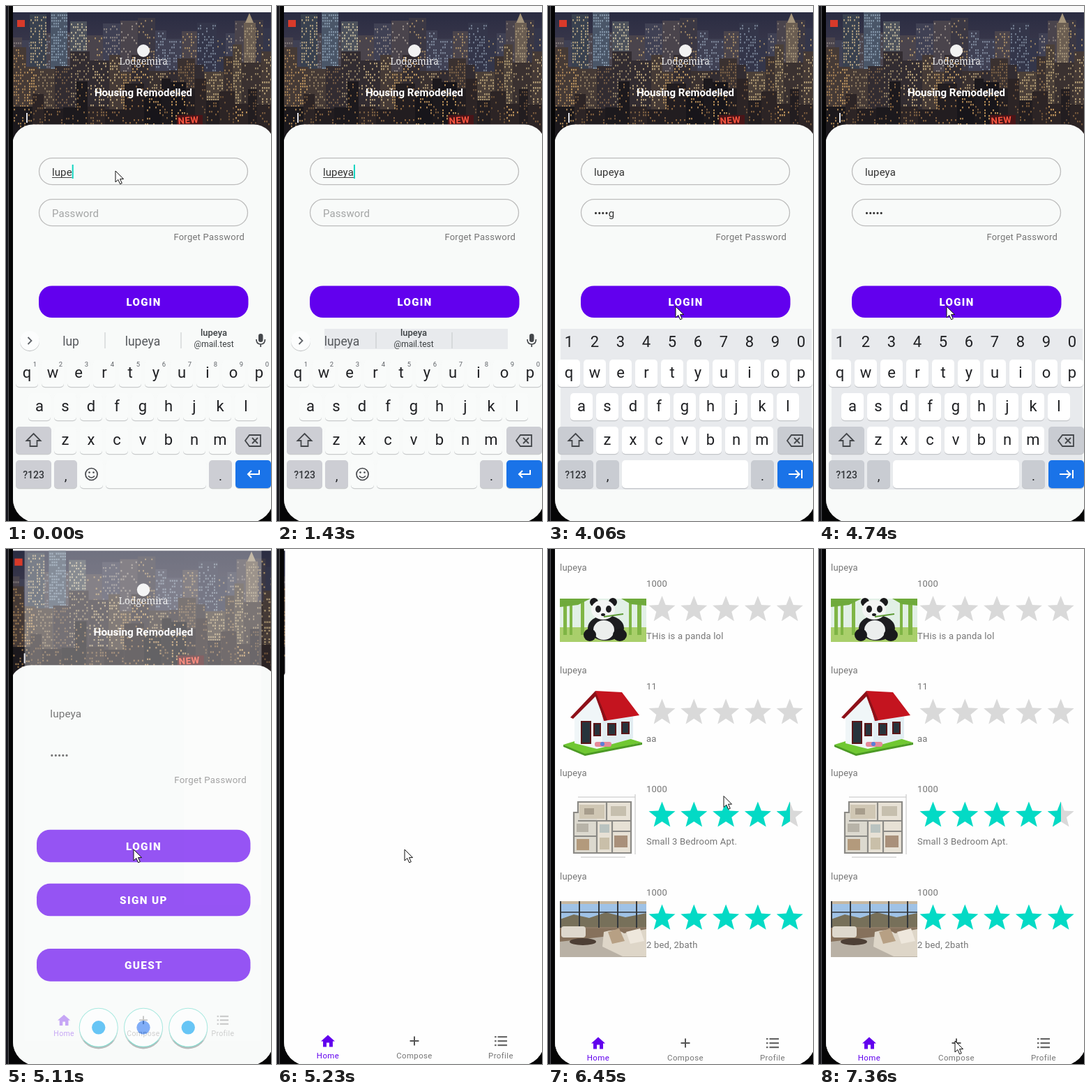
These frames come from a looping animation (380x737 px, 8 s). An HTML page:

```html
<!DOCTYPE html>
<html lang="en">
<head>
<meta charset="utf-8">
<title>Login to home feed</title>
<style>
  html, body { margin: 0; width: 100%; height: 100%; overflow: hidden; background: #050506; }
  svg { display: block; width: 380px; height: 737px; font-family: Roboto, sans-serif; white-space: pre; }
</style>
</head>
<body>
<svg id="stage" viewBox="0 0 380 737"></svg>
<script>
const LOOP = 8000, USER = 'lupeya', PASSWORD = 'loyng';
const PURPLE = '#6200ee', TEAL = '#03dac5', GREY = '#757575', INK = '#202124';

// Markup helpers
const rect = (x, y, w, h, fill, rx = 0, more = '') =>
  `<rect x="${x}" y="${y}" width="${w}" height="${h}" rx="${rx}" fill="${fill}" ${more}/>`;
const circle = (x, y, r, fill, more = '') => `<circle cx="${x}" cy="${y}" r="${r}" fill="${fill}" ${more}/>`;
const oval = (x, y, rx, ry, fill) => `<ellipse cx="${x}" cy="${y}" rx="${rx}" ry="${ry}" fill="${fill}"/>`;
const path = (d, fill, more = '') => `<path d="${d}" fill="${fill}" ${more}/>`;
const line = (d, color, width = 1.8) => path(d, 'none', `stroke="${color}" stroke-width="${width}"`);
const text = (x, y, s, size, fill, more = '') =>
  `<text x="${x}" y="${y}" font-size="${size}" fill="${fill}" ${more}>${s}</text>`;
const MID = 'text-anchor="middle" ';
const group = (id, body, more = '') => `<g id="${id}" ${more}>${body}</g>`;

function city() {
  let seed = 29;
  const random = () => (seed = (seed * 16807) % 2147483647) / 2147483647;
  const pick = list => list[Math.floor(random() * list.length)];
  const tower = (x, top, w, fill, glow, density) => {
    let d = '';
    for (let wy = top + 3; wy < 172; wy += 4)
      for (let wx = x + 1; wx < x + w - 1.5; wx += 3)
        if (random() < density) d += `M${wx} ${wy}h2v2.4h-2z`;
    return rect(x, top, w, 205 - top, fill) + path(d, glow, `opacity="${(.45 + random() * .45).toFixed(2)}"`);
  };
  const row = (high, low, fills, glows, density) => {
    let out = '';
    for (let x = 10, w; x < 384; x += w) {
      w = 13 + Math.floor(random() * 6) * 3;
      const top = Math.round(high + random() * (low - high));
      out += tower(x, top, w, pick(fills), pick(glows), density * (.5 + random()));
    }
    return out;
  };
  return rect(0, 9, 390, 196, 'url(#sky)') +
    row(14, 52, ['#34364a', '#404154', '#3b3844', '#4a444c'], ['#a39a92', '#b09468', '#8793a6'], .3) +
    tower(34, 12, 24, '#39414f', '#b9a684', .5) + tower(64, 9, 24, '#4a5668', '#9fb4c8', .55) +
    tower(92, 22, 24, '#4d525c', '#c3b89c', .55) + tower(341, 24, 17, '#6b5e52', '#b8a486', .5) +
    path('M343 24l6-14 6 14z', '#a5957c') +
    row(54, 96, ['#3a3130', '#453a36', '#322c31', '#4b4039'], ['#d0a566', '#b98f5a', '#dcc08c'], .42) +
    row(104, 148, ['#17151a', '#221d20', '#2c2425', '#1c191d'], ['#a87a48', '#8f6a44', '#c79a5e'], .26) +
    rect(16, 20, 11, 10, '#d83a2a') + rect(29, 153, 2, 14, '#e4e4ea') + rect(245, 156, 37, 16, '#4a1518') +
    text(247, 169, 'NEW', 13, '#ff5540', 'font-weight="700" letter-spacing=".6" transform="rotate(-4 247 169)"');
}

const button = (y, label) =>
  rect(47, y, 300.5, 45.7, PURPLE, 19, label === 'LOGIN' ? 'id="login"' : '') +
  text(197.5, y + 28.5, label, 15, '#fff', MID + 'font-weight="800" letter-spacing="1.35"');

const field = y => rect(47.5, y, 299, 38, 'none', 19, 'class="outline" stroke="#bdbdbd" stroke-width="1.3"');

function loginScreen() {
  const social = [[134, '#1da9f2'], [197, '#4285f4'], [260, '#1da9f2']].map(([x, color]) =>
    circle(x, 681, 27, '#b8bcbc') + circle(x, 678, 27, '#fcfdfd', 'stroke="#7fe0d2" stroke-width="1"') +
    circle(x, 678, 9.5, color)).join('');
  return rect(0, -70, 390, 810, '#f9f9f9') + city() +
    circle(197, 64, 9, '#f2f2f2') +
    text(197, 84, 'Lodgemira', 13.5, '#eee', MID + 'font-family="Noto Serif, serif"') +
    text(197, 128.5, 'Housing Remodelled', 15, '#fff', MID + 'font-weight="700"') +
    rect(9, 169.5, 376, 590, '#f8faf9', 30) +
    field(217.7) + field(276.7) +
    text(66, 243, '', 15, '#333', 'id="user" letter-spacing=".1"') +
    rect(66, 245, 0, 1, '#444', 0, 'id="underline"') +
    text(66, 302, '', 15, '#333', 'id="pass" letter-spacing=".1"') +
    rect(0, 0, 2, 20, '#12d5c1', 0, 'id="caret"') +
    text(342, 335, 'Forget Password', 13, GREY, 'text-anchor="end" letter-spacing=".25"') +
    button(400.4, 'LOGIN') + group('more', button(476, 'SIGN UP') + button(567.5, 'GUEST') + social);
}

const ROWS = [['qwertyuiop', 30, 506], ['asdfghjkl', 48, 554], ['zxcvbnm', 85, 602]];

function keyboard(dense) {
  const face = dense ? '#fff' : '#f9fbfa', special = dense ? '#c9ccd2' : '#cdced4';
  const key = (x, y, w, fill = face, h = 39) =>
    rect(x, y + 1.2, w, h, dense ? '#c3c5c9' : '#c9cbcc', 5) + rect(x, y, w, h, fill, 5);
  let out = dense ? rect(18, 462, 360, 230, '#e8eaed') : '';
  for (const [letters, left, y] of ROWS) [...letters].forEach((c, i) => {
    const x = left + 37 * i;
    out += key(x - 16, y, 32) + text(x, y + 25.5, c, 22, INK, MID);
    if (y === 506) {
      const digit = (i + 1) % 10;
      out += dense ? text(x, 488, digit, 22, INK, MID) : text(x + 11.5, 516, digit, 9.5, '#5f6368', MID);
    }
  });
  out += key(14, 602, 51, special) + key(329, 602, 51, special) +
    line('M39.5 612l10 10h-5v8h-10v-8h-5z', '#44474b') +
    line('M343 622l6-8h16v16h-16zM353 618l8 8M361 618l-8 8', '#44474b') +
    key(14, 650, 51, special, 40) + text(39.5, 675.5, '?123', 14, '#33363a', MID + 'font-weight="500"') +
    key(69, 650, 33, special, 40) + text(85.5, 679, ',', 19, INK, MID) +
    key(291, 650, 33, special, 40) + text(307.5, 679, '.', 19, INK, MID) + key(329, 650, 51, '#1a73e8', 40);
  if (dense) return out + key(106, 650, 181, face, 40) +
    line('M345 670h15M355 664.500l5.500 5.500-5.500 5.500M364 664v12', '#fff', 2);
  return out + key(106, 650, 33, face, 40) + key(143, 650, 144, face, 40) +
    circle(122.5, 670, 8.5, 'none', 'stroke="#44474b" stroke-width="1.7"') +
    circle(119.5, 667.5, 1.3, '#44474b') + circle(125.5, 667.5, 1.3, '#44474b') +
    line('M118 672.500q4.500 5 9 0', '#44474b', 1.6) +
    line('M363 664v6h-16M352 665l-5 5 5 5', '#fff', 2) +
    rect(68, 462, 263, 29, '#e8eaed', 0, 'id="strip"') +
    circle(34, 480.2, 14, '#c5c7c8') + circle(34, 479, 14, '#fcfdfd') +
    line('M31.500 474l5 5-5 5', '#5f6368') +
    rect(141.5, 467, 1, 23, '#c4c7ca') + rect(250.5, 467, 1, 23, '#c4c7ca') +
    text(93, 486, '', 17.5, '#55585c', MID + 'id="guess"') +
    text(196, 486, USER, 17.5, '#55585c', MID + 'id="name"') +
    group('mail', text(298, 472, USER, 13, '#3c4043', MID + 'font-weight="500"') +
      text(298, 488, '@mail.test', 12, '#3c4043', MID)) +
    rect(362, 469, 6.500, 12, '#44474b', 3.2) + line('M359 477q0 7 6.200 7t6.200-7M365.200 484v4', '#44474b', 1.7);
}

function star(cx, cy, fill, more = '') {
  const points = Array.from({ length: 10 }, (_, i) => {
    const r = i % 2 ? 8.6 : 20, a = i * Math.PI / 5;
    return (cx + r * Math.sin(a)).toFixed(1) + ',' + (cy - r * Math.cos(a)).toFixed(1);
  });
  return `<polygon points="${points.join(' ')}" fill="${fill}" ${more}/>`;
}

function panda() {
  const bamboo = [[22, 5], [31, 4], [47, 5], [116, 4], [128, 6]].map(([x, w]) => rect(x, 71, w, 52, '#7fb545')).join('');
  return rect(17, 71, 124, 62, '#e2f0e6') + rect(17, 112, 124, 21, '#a9cf6b') + bamboo +
    path('M17 71h44l-18 9-26 3zM141 71h-36l14 8 22 2z', '#6faa3c') +
    oval(83, 113, 26, 18, '#1d1d20') + oval(80, 116, 15, 14, '#eceeed') +
    oval(60, 123, 9, 9, '#19191b') + oval(103, 123, 10, 9, '#19191b') +
    circle(66, 76, 6, '#1a1a1c') + circle(93, 76, 6, '#1a1a1c') + oval(79, 87, 17, 14, '#f4f5f4') +
    oval(72, 86, 4, 5, '#1d1d20') + oval(87, 86, 4, 5, '#1d1d20') + oval(79, 94, 3, 2, '#1d1d20') +
    line('M80 97l28-4', '#5d9a35', 2);
}

function house() {
  const pane = (x, y, w, h) => rect(x, y, w, h, '#5a1618') + rect(x + 2, y + 2, w - 4, h - 4, '#27343c');
  return path('M22 280l62-19 51 16-82 18z', '#70c832') + path('M22 280l31 13 82-16v3l-82 16-31-13z', '#4c9a25') +
    path('M38 238l30-30 14 35v40l-12 3-32-8z', '#f0f6f8') + path('M78 238l44-6v39l-44 12z', '#e2edf2') +
    path('M68 203l38 2 25 33-51 8z', '#c4141f') + path('M68 203l-36 38 4 2 32-32 13 35 4-1z', '#8e1018') +
    pane(47, 246, 15, 33) + pane(65, 249, 11, 19) + pane(85, 249, 13, 18) + pane(105, 247, 12, 18) +
    rect(67, 276, 24, 7, '#e58a9a', 3) + circle(78, 279, 3, '#5a7fd8');
}

function plan() {
  const walls = 'M43 362h76v73h-82v-58h6zM43 389h76M70 389v46M92 389v46M37 411h33M92 404h27M84 362v27';
  return rect(43, 362, 76, 73, '#e7e1d5') + rect(37, 377, 33, 58, '#dcd9cf') +
    rect(45, 366, 36, 20, '#d0c7b4') + rect(52, 371, 14, 9, '#a79d8c') + rect(90, 368, 22, 14, '#c6bfae') +
    rect(41, 415, 18, 16, '#b39a7c') + rect(95, 410, 19, 17, '#a9907a') + rect(74, 394, 14, 12, '#b9c3c0') +
    rect(74, 413, 14, 17, '#c9bfa9') + rect(41, 393, 17, 12, '#b7b3a8') + line(walls, '#8b8a86', 2.2) +
    line('M43 355h82M125 351v86M47 441h64', '#c2c2c2', 1);
}

function lounge() {
  const mullions = [17, 44, 72, 99, 126].map(x => rect(x, 504, 2, 38, '#34383c')).join('');
  return rect(17, 504, 124, 80, '#8e7b66') + rect(17, 504, 124, 32, '#9fc2e6') +
    path('M17 530l20-7 22 5 24-8 28 7 30-6v20h-124z', '#77705a') + rect(17, 504, 124, 4, '#c7b79f') + mullions +
    rect(17, 519, 124, 1.5, '#34383c') + rect(17, 543, 124, 41, '#86715c') +
    path('M17 562l70-8 54 18v12h-124z', '#b9b1a5') + rect(19, 540, 35, 16, '#ded8cd', 4) +
    oval(50, 562, 19, 5, '#4d3f35') + path('M80 548q18-6 29 2l32-6v39h-34l-29-14z', '#ded6c8') +
    path('M86 548l16-5 8 18-18 4z', '#b7a084') + path('M112 548l20-5 6 18-20 4z', '#eee7dc');
}

const POSTS = [['1000', 0, 'THis is a panda lol'], ['11', 0, 'aa'],
  ['1000', 4.5, 'Small 3 Bedroom Apt.'], ['1000', 5, '2 bed, 2bath']];

function post([price, rating, title], row) {
  const y = row * 147.2, label = (x, dy, s) => text(x, y + dy, s, 13, GREY, 'letter-spacing=".22"');
  let stars = '';
  for (let i = 0; i < 5; i++) {
    const x = 163.5 + 45.8 * i, share = rating - i;
    stars += star(x, y + 87, share >= 1 ? TEAL : '#d9d9d9');
    if (share > 0 && share < 1) stars += star(x, y + 87, TEAL, 'clip-path="url(#half)"');
  }
  return label(17, 31, USER) + label(141, 54, price) + stars + label(141, 129, title);
}

function homeScreen() {
  const label = (x, s, color) => text(x, 732, s, 11.5, color, MID + 'letter-spacing=".4"');
  const bullets = [701, 707, 713].map(y => rect(313, y - 1, 2.5, 2.2, '#666') + rect(317.5, y - 1, 13.5, 2.2, '#666')).join('');
  return rect(10, -62, 373, 801, '#fefefe') +
    group('posts', POSTS.map(post).join('')) +
    group('photos', panda() + house() + plan() + lounge()) +
    path('M72 698.500l10 9h-3v8h-5v-6h-4v6h-5v-8h-3z', PURPLE) + label(72, 'Home', PURPLE) +
    line('M197 700.500v13M190.500 707h13', '#555', 2) + label(197, 'Compose', GREY) +
    bullets + label(322, 'Profile', GREY);
}

const stage = document.getElementById('stage');
stage.innerHTML = `<defs>
  <linearGradient id="sky" x2="0" y2="1"><stop stop-color="#2a2c42"/><stop offset=".5" stop-color="#4a4454"/><stop offset="1" stop-color="#2a2226"/></linearGradient>
  <clipPath id="screen">${rect(10, -62, 373, 801, '#000', 34)}</clipPath>
  <clipPath id="half">${rect(300, 300, 47, 300, '#000')}</clipPath></defs>` +
  rect(0, 0, 380, 737, '#050506') + rect(0, 0, 1.2, 737, '#1c1c2a') + rect(2.5, 0, 1.6, 737, '#4c4c52') +
  group('view', group('loginView', loginScreen()) + group('keysText', keyboard(false)) +
    group('keysDense', keyboard(true)) + group('homeView', homeScreen()), 'clip-path="url(#screen)"') +
  group('mouse', path('M0 0v16l3.800-3.500 2.800 6.300 2.700-1.200-2.800-6h5z', '#fff', 'stroke="#111" stroke-width="1"'));

const el = {};
stage.querySelectorAll('[id]').forEach(node => el[node.id] = node);
const outlines = stage.querySelectorAll('.outline');
const set = (node, name, value) => node.setAttribute(name, value);
const show = (node, on) => set(node, 'visibility', on ? 'visible' : 'hidden');

// Last entry whose time has been reached
const stepped = (keys, t) => keys.reduce((hit, key) => t >= key[0] ? key : hit);

const MOUSE = [[0, 157, 236], [1190, 157, 236], [1400, 213, 230], [1550, 325, 205], [1700, 190, 270],
  [1780, 140, 299], [3599, 140, 299], [3600, 160, 310], [3730, 160, 310], [4060, 183, 430], [6280, 183, 430],
  [6450, 252, 354], [6520, 252, 325], [6620, 238, 370], [6780, 200, 500], [6930, 178, 610], [7140, 202, 684],
  [7360, 195, 704], [LOOP, 195, 704]];

function mouseAt(t) {
  const i = Math.max(1, MOUSE.findIndex(key => key[0] > t));
  const [t0, x0, y0] = MOUSE[i - 1], [t1, x1, y1] = MOUSE[i];
  const k = (t - t0) / (t1 - t0);
  return [x0 + (x1 - x0) * k, y0 + (y1 - y0) * k];
}

const TYPED = [[0, 4], [150, 5], [270, 6]];
const GUESS = [[0, 3], [210, 4], [440, 6]];
const SECRET = [[0, 0], [2690, 1], [2870, 2], [2990, 3], [3110, 4], [3290, 5]];
const CARET = [[0, 1], [940, 0], [1430, 1], [2200, 0], [2690, 1], [3790, 0], [4290, 1], [4740, 0]];
const PRESS = [[0, PURPLE], [4200, '#7a28f0'], [4290, '#8a43f2'], [4380, PURPLE]];
const OPEN = [[0, .85, 0], [5110, .911, .33], [5170, .963, .8], [5230, .992, 1], [5290, .996, 1], [5350, .998, 1], [5380, 1, 1]];
const LOAD = [[0, 0], [5910, .2], [5970, .4], [6030, .6], [6100, .8], [6160, 1]];

const zoom = s => `translate(197 338) scale(${s}) translate(-197 -338)`;

function render(t) {
  const leaving = t >= 5110, inPassword = t >= 1700, dense = t >= 1780, offered = t >= 440;

  el.user.textContent = USER.slice(0, stepped(TYPED, t)[1]);
  const userWidth = el.user.getComputedTextLength();
  set(el.underline, 'width', inPassword ? 0 : userWidth);

  const count = stepped(SECRET, t)[1], masked = t >= 4740 ? count : Math.max(0, count - 1);
  el.pass.textContent = count ? '•'.repeat(masked) + PASSWORD.slice(masked, count) : 'Password';
  set(el.pass, 'fill', count ? '#333' : '#a3a5a5');
  const passWidth = count ? el.pass.getComputedTextLength() : 0;
  set(el.caret, 'x', 66 + (inPassword ? passWidth : userWidth));
  set(el.caret, 'y', inPassword ? 286 : 227);
  show(el.caret, stepped(CARET, t)[1] && !leaving);
  set(el.login, 'fill', stepped(PRESS, t)[1]);

  el.guess.textContent = USER.slice(0, stepped(GUESS, t)[1]);
  show(el.keysText, !dense);
  show(el.keysDense, dense && !leaving);
  set(el.strip, 'opacity', offered ? 1 : 0);
  set(el.name, 'opacity', offered ? 0 : 1);
  set(el.mail, 'transform', offered ? 'translate(-102 0)' : '');

  show(el.more, leaving);
  outlines.forEach(node => show(node, !leaving));
  set(el.loginView, 'transform', leaving ? zoom(1.02) : '');
  const [, scale, alpha] = stepped(OPEN, t);
  set(el.homeView, 'transform', zoom(scale));
  set(el.homeView, 'opacity', alpha);
  show(el.posts, t >= 5730);
  set(el.photos, 'opacity', stepped(LOAD, t)[1]);

  set(el.mouse, 'transform', `translate(${mouseAt(t)})`);
  show(el.mouse, t < 1430 || t >= 1550);
}

const start = performance.now();
function frame() {
  render((performance.now() - start) % LOOP);
  requestAnimationFrame(frame);
}
frame();
</script>
</body>
</html>
```
